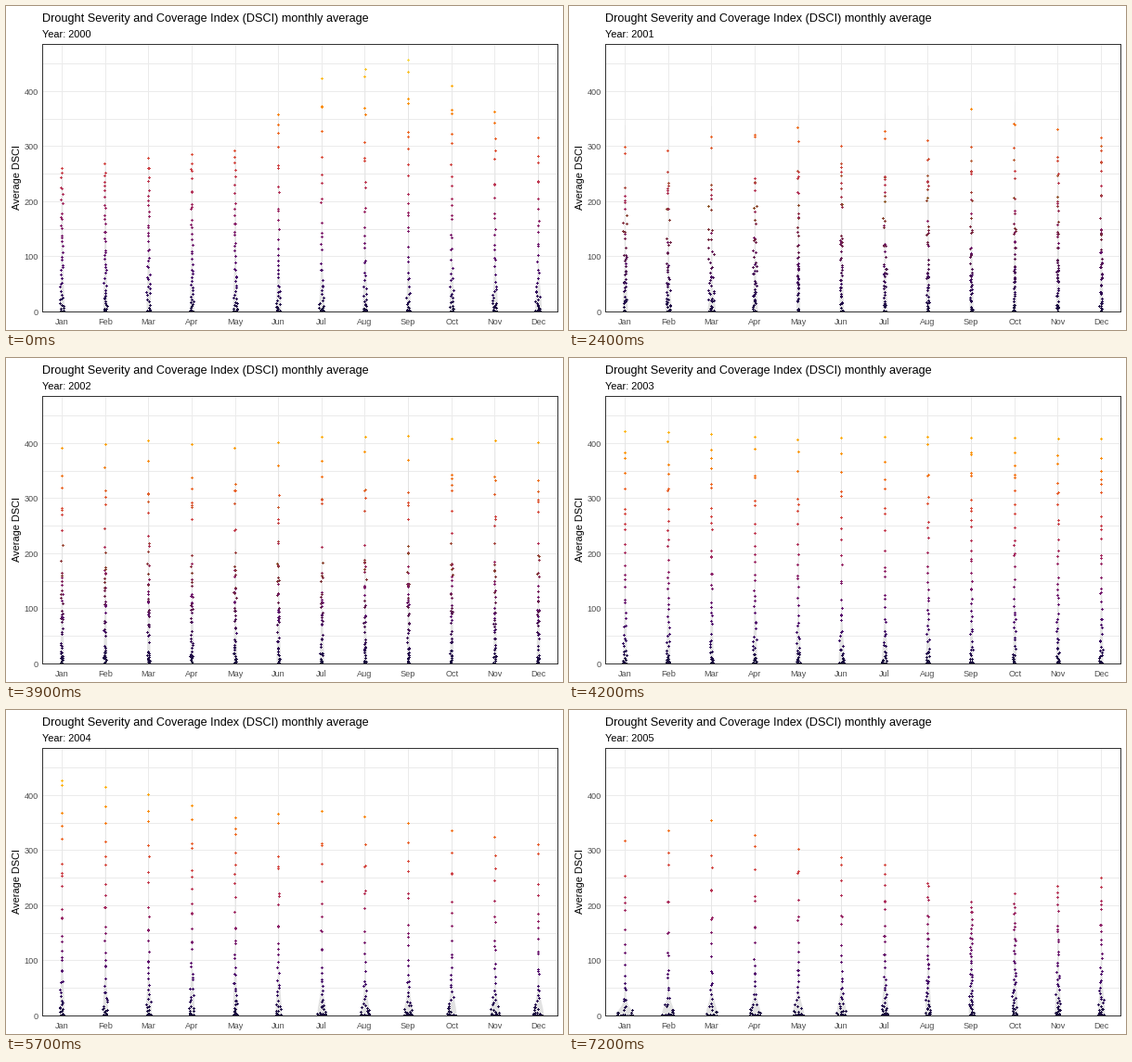
A matplotlib script that plays this animation: 600x350 px, repeating every 8000 ms.

```python
import numpy as np
import matplotlib.pyplot as plt
from matplotlib.animation import FuncAnimation
from matplotlib.collections import PolyCollection
from matplotlib.patches import Rectangle

W, H, DPI = 600, 350, 100
PX = 72 / DPI                       # one pixel in points
LEFT, TOP, RIGHT, BOTTOM = 39.2, 41.2, 594.2, 330.2
UNIT = 0.5955                       # pixels per index point
STEP, FIRST = 46.64, 60.5           # month columns
STATES, DRY = 52, 40                # all states, and those above zero
MONTHS = "Jan Feb Mar Apr May Jun Jul Aug Sep Oct Nov Dec".split()
HOLD, CYCLE, LEAD = 1200, 1500, 300
TICK_MS, LOOP_MS = 100, 8000

# Per year, at a few key months: highest index, and how steeply it
# falls from the driest state to the wettest
KEY_MONTHS = (0, 2, 4, 6, 8, 11)
PEAK = [(260, 279, 292, 424, 457, 316),
        (315, 354, 339, 310, 362, 342),
        (362, 392, 375, 410, 415, 394),
        (422, 417, 407, 412, 410, 408),
        (427, 402, 360, 371, 350, 310),
        (317, 354, 302, 273, 207, 250)]
FALL = [(1.6, 1.7, 2.0, 3.6, 2.8, 3.2),
        (3.5, 5.0, 2.8, 3.3, 2.7, 1.8),
        (1.6, 1.8, 1.4, 1.6, 1.7, 2.1),
        (2.7, 2.3, 3.2, 3.6, 2.1, 2.4),
        (2.9, 3.4, 2.7, 4.2, 4.2, 4.2),
        (5.6, 4.9, 4.7, 3.0, 1.6, 2.8)]
YEARS = len(PEAK)

rng = np.random.default_rng(11)


def spread(peak, fall):
    """Index values of all states, driest first."""
    rank = np.arange(STATES) + rng.uniform(-0.7, 0.7, STATES)
    rank[0] = 0
    return np.sort(peak * np.clip(1 - rank / DRY, 0, 1) ** fall)[::-1]


def half_width(vals, at):
    """Violin half width in pixels from a Gaussian density."""
    q1, q3 = np.percentile(vals, (25, 75))
    bw = 0.9 * min(vals.std(), (q3 - q1) / 1.34) * vals.size ** -0.2
    z = (np.asarray(at)[:, None] - vals) / bw
    dens = np.exp(-z * z / 2).mean(axis=1) / (bw * np.sqrt(2 * np.pi))
    return np.minimum(400 * dens, 9)


def to_y(v):
    return BOTTOM + 0.3 - UNIT * np.asarray(v)


def to_color(v):
    return plt.cm.inferno(0.1 + 0.87 * np.asarray(v) / 500)


def build():
    shape = (YEARS, len(MONTHS), STATES)
    value, x = np.zeros(shape), np.zeros(shape)
    violin = np.zeros(shape[:2] + (160, 2))
    score = rng.normal(size=STATES)
    for i in range(YEARS):
        # a state's rank carries over partly from year to year
        score = 0.4 * score + 0.9 * rng.normal(size=STATES)
        for m in range(len(MONTHS)):
            vals = spread(np.interp(m, KEY_MONTHS, PEAK[i]),
                          np.interp(m, KEY_MONTHS, FALL[i]))
            mid = FIRST + STEP * m
            order = np.argsort(score + rng.normal(0, 0.15, STATES))
            value[i, m, order] = vals
            x[i, m, order] = mid + half_width(vals, vals) * rng.uniform(-1, 1, STATES)
            grid = np.linspace(0, vals[0], 80)
            w = half_width(vals, grid)
            violin[i, m, :, 0] = np.concatenate([mid - w, (mid + w)[::-1]])
            violin[i, m, :, 1] = to_y(np.concatenate([grid, grid[::-1]]))
    return value, x, violin


value, dot_x, violin = build()
dot_y, color = to_y(value), to_color(value)

plt.rcParams["font.family"] = "Liberation Sans"
fig = plt.figure(figsize=(W / DPI, H / DPI), dpi=DPI, facecolor="white")
ax = fig.add_axes([0, 0, 1, 1])
ax.axis("off")


def grid_line(xs, ys):
    ax.plot(xs, ys, color="#EBEBEB", lw=PX, antialiased=False, zorder=0,
            solid_capstyle="butt")


def label(x, y, s, px, col="black", **kw):
    return ax.text(x, y, s, fontsize=px * PX, color=col, **kw)


ax.add_patch(Rectangle((LEFT, TOP), RIGHT - LEFT, BOTTOM - TOP, fill=False,
                       ec="#333333", lw=PX, antialiased=False, zorder=4))

for v in range(0, 500, 50):
    y = np.floor(to_y(v)) + 0.2
    grid_line((LEFT, RIGHT), (y, y))
    if v % 100 == 0:
        label(34.7, y + 3.4, str(v), 9.1, "#4D4D4D", ha="right")
for m, name in enumerate(MONTHS):
    x = np.floor(FIRST + STEP * m) + 0.2
    grid_line((x, x), (TOP, BOTTOM))
    label(x, 344, name, 9.2, "#4D4D4D", ha="center")

label(39, 17, "Drought Severity and Coverage Index (DSCI) monthly average", 12.65)
subtitle = label(39, 34, "", 11)
label(17, 184.5, "Average DSCI", 11, rotation=90, ha="right", va="center")

shapes = PolyCollection(list(violin[0]), facecolors="#E2E2E2",
                        edgecolors="none", zorder=1)
ax.add_collection(shapes, autolim=False)
dots = ax.scatter(dot_x[0].ravel(), dot_y[0].ravel(), marker="P",
                  s=(3 * PX) ** 2, linewidths=0, zorder=2)
ax.set(xlim=(0, W), ylim=(H, 0))
clip = Rectangle((LEFT, TOP), RIGHT - LEFT, BOTTOM - TOP + 0.8,
                 transform=ax.transData)
shapes.set_clip_path(clip)
dots.set_clip_path(clip)


def draw(frame):
    i, rest = divmod(frame * TICK_MS + LEAD, CYCLE)
    mix = 0.5 if rest >= HOLD else 0      # one halfway step between years
    j = min(i + 1, YEARS - 1)

    def between(a):
        return (1 - mix) * a[i] + mix * a[j]

    xy = np.column_stack([between(dot_x).ravel(), between(dot_y).ravel()])
    dots.set_offsets(np.floor(xy) + 0.5)
    dots.set_facecolors(between(color).reshape(-1, 4))
    shapes.set_verts(list(between(violin)))
    subtitle.set_text(f"Year: {2000 + i}")
    return dots, shapes, subtitle


anim = FuncAnimation(fig, draw, frames=LOOP_MS // TICK_MS, interval=TICK_MS,
                     repeat=True, repeat_delay=0, blit=False)
plt.show()
```
